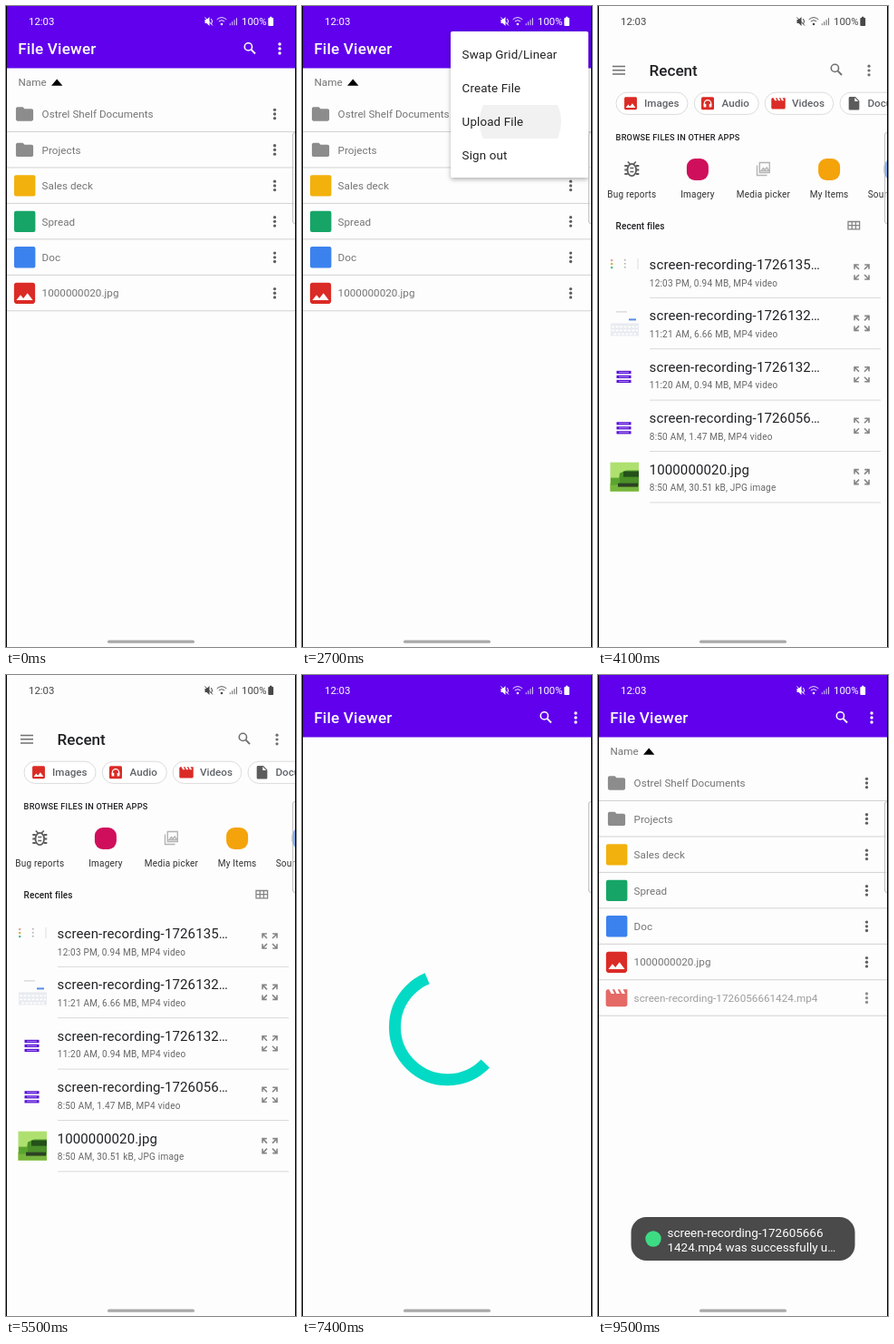
Animation of 320 by 706 pixels, one loop 9.6 s. Source, as an HTML page:

```html
<!DOCTYPE html>
<html lang="en">
<head>
<meta charset="utf-8">
<title>File Viewer</title>
<style>
  html, body { margin: 0; width: 100%; height: 100%; overflow: hidden; background: #fdfdfd; }
  svg { display: block; width: 100vw; height: 100vh; }
  text { font-family: Roboto, sans-serif; white-space: pre; }
</style>
</head>
<body>
<svg id="stage" viewBox="0 0 320 706" xmlns="http://www.w3.org/2000/svg"></svg>
<script>
const LOOP = 9600, STEP = 100;
const PURPLE = '#6000ec', PAGE = '#fdfdfd', RED = '#db2b26';
const ROW = 39.45, PICK_ROW = 56.4;

// Markup helpers
const text = (x, y, size, fill, str, { weight = 400, spacing = 0, anchor = 'start' } = {}) =>
  `<text x="${x}" y="${y}" font-size="${size}" fill="${fill}" font-weight="${weight}" letter-spacing="${spacing}" text-anchor="${anchor}">${str}</text>`;
const rect = (x, y, w, h, fill, r = 0, extra = '') =>
  `<rect x="${x}" y="${y}" width="${w}" height="${h}" rx="${r}" fill="${fill}" ${extra}/>`;
const circle = (x, y, r, fill, extra = '') => `<circle cx="${x}" cy="${y}" r="${r}" fill="${fill}" ${extra}/>`;
const stroke = (d, color, width = 1.5, extra = '') =>
  `<path d="${d}" fill="none" stroke="${color}" stroke-width="${width}" ${extra}/>`;
const group = (id, body, extra = '') => `<g id="${id}" ${extra}>${body}</g>`;
const clip = (id, x, y, w, h) => `<clipPath id="${id}">${rect(x, y, w, h, '#000')}</clipPath>`;
const list = (items, fn) => items.map(fn).join('');

// Icons on a 24-unit grid
const glyphs = {
  folder: 'M10 4H4c-1.1 0-2 .9-2 2v12c0 1.1.9 2 2 2h16c1.1 0 2-.9 2-2V8c0-1.1-.9-2-2-2h-8z',
  image: 'M21 19V5c0-1.1-.9-2-2-2H5c-1.1 0-2 .9-2 2v14c0 1.1.9 2 2 2h14c1.1 0 2-.9 2-2zM8.5 13.5l2.5 3 3.5-4.5 4.5 6H5z',
  movie: 'M18 4l2 4h-3l-2-4h-2l2 4h-3l-2-4H8l2 4H7L5 4H4c-1.1 0-2 .9-2 2v12c0 1.1.9 2 2 2h16c1.1 0 2-.9 2-2V4z',
  file: 'M14 2H6c-1.1 0-2 .9-2 2v16c0 1.1.9 2 2 2h12c1.1 0 2-.9 2-2V8zM13 9V3.5L18.5 9z',
};
const icon = (name, cx, cy, size, fill) =>
  `<path d="${glyphs[name]}" fill="${fill}" transform="translate(${cx - size / 2} ${cy - size / 2}) scale(${size / 24})"/>`;
const dots = (x, y, gap, r, fill) => list([-gap, 0, gap], d => circle(x, y + d, r, fill));
const search = (x, y, fill) =>
  circle(x - 1.6, y - 1.6, 4.1, 'none', `stroke="${fill}" stroke-width="1.6"`) +
  stroke(`M${x + 1.4} ${y + 1.4}l4.6 4.6`, fill, 1.9);

function statusBar() {
  const bars = list([0, 1, 2, 3], i => rect(246.8 + i * 2.4, 19.2 - i * 2, 1, 2 + i * 2, 'currentColor', 0, 'opacity=".8"'));
  const arcs = list([5.3, 3.2], r => stroke(`M${238 - r} ${20.2 - r}q${r} ${-r * .85} ${2 * r} 0`, 'currentColor', .9));
  return text(25, 21, 11.4, 'currentColor', '12:03') +
    '<path d="M219.5 15h2l3-3v10l-3-3h-2z" fill="currentColor"/>' +
    stroke('M219.5 12.5l8.5 9M226.5 14q2 3 0 6', 'currentColor', 1) +
    arcs + circle(238, 20, 1.3, 'currentColor') + bars +
    text(260, 21, 11.4, 'currentColor', '100%') +
    rect(289.3, 13, 5.8, 9, 'currentColor', 1) + rect(291, 11.8, 2.4, 2, 'currentColor');
}

const files = [
  ['Ostrel Shelf Documents', y => icon('folder', 20.5, y, 23, '#8c8c8c')],
  ['Projects', y => icon('folder', 20.5, y, 23, '#8c8c8c')],
  ['Sales deck', y => rect(9, y - 11.7, 23.4, 23.4, '#f2b10c', 2)],
  ['Spread', y => rect(9, y - 11.7, 23.4, 23.4, '#17a567', 2)],
  ['Doc', y => rect(9, y - 11.7, 23.4, 23.4, '#3c82ee', 2)],
  ['1000000020.jpg', y => icon('image', 20.5, y, 31, RED)],
  ['screen-recording-1726056661424.mp4', y => icon('movie', 20.5, y, 28.5, RED)],
];
function fileRow([name, draw], i) {
  const y = 119 + i * ROW;
  return group('row' + i, draw(y) + text(39.6, y + 4.2, 11.67, '#757575', name, { spacing: .03 }) +
    dots(296.5, y, 4.7, 1.65, '#606060')) +
    rect(1, y + 19, 318, 1, '#d2d2d2', 0, `id="line${i}"`);
}

const viewer = rect(0, 0, 320, 706, PAGE) +
  group('files', text(13.5, 88.3, 11.67, '#757575', 'Name') +
    '<path d="M50 87.8l6.2-7.2 6.2 7.2z" fill="#000"/>' + files.map(fileRow).join('')) +
  group('spinner', circle(160.5, 387.7, 58, 'none',
    'id="arc" pathLength="1" stroke="#03dac5" stroke-width="13"')) +
  rect(0, 0, 320, 68.5, PURPLE) +
  text(13.2, 53, 17.1, '#fff', 'File Viewer', { weight: 500, spacing: .21 }) +
  search(269, 46.5, '#fff') + dots(302, 47, 5, 1.7, '#fff') +
  circle(302, 47, 16, '#fff', 'id="tap"');

const menu = rect(164, 28, 152, 161, '#fff', 2, 'filter="url(#shadow)"') +
  circle(241, 127.5, 45, '#f1f1f1', 'id="menuRipple" clip-path="url(#menuItem)"') +
  list(['Swap Grid/Linear', 'Create File', 'Upload File', 'Sign out'], (s, i) =>
    text(176.6, 58.3 + i * 37, 13.4, '#222', s, { spacing: .125 }));

const bug = (x, y, c) =>
  `<ellipse cx="${x}" cy="${y + .5}" rx="4.8" ry="6.6" fill="none" stroke="${c}" stroke-width="1.8"/>` +
  list([-4, .5, 5], d => stroke(`M${x - 8} ${y + d}h3.5M${x + 4.5} ${y + d}h3.5`, c, 1.8)) +
  stroke(`M${x - 4.5} ${y - 8.5}l2.5 2.5M${x + 4.5} ${y - 8.5}l-2.5 2.5M${x - 2} ${y - 1.5}h4M${x - 2} ${y + 2.5}h4`, c, 1.7);

const headphones = (x, y) => rect(x - 7, y - 7, 14, 14, RED, 1.5) +
  stroke(`M${x - 3.7} ${y + 3}v-3a3.7 3.7 0 0 1 7.4 0v3`, '#fff', 1.2) +
  rect(x - 4.3, y + .5, 2.6, 3.6, '#fff') + rect(x + 1.7, y + .5, 2.6, 3.6, '#fff');

const chips = [
  [20, 79, 51, 'Images', icon('image', 36, 107.3, 18.5, RED)],
  [106.3, 71, 136.5, 'Audio', headphones(121, 107.3)],
  [184.2, 75.5, 214, 'Videos', icon('movie', 199, 107.3, 18.5, RED)],
  [267, 100, 297.5, 'Documents', icon('file', 282.5, 107.3, 17.5, '#5c5c5c')],
];
const apps = [
  ['Bug reports', x => bug(x, 180, '#5c5c5c')],
  ['Imagery', x => rect(x - 12, 168, 24, 24, '#cf0f5c', 9)],
  ['Media picker', x => stroke(`M${x - 4.2} 172.5h11v11h-11zM${x - 7} 175.5v11h11M${x - 2.5} 181.5l2.4-3 1.8 2 2-2.6 2.5 3.6z`, '#b5b5b5', 1.4)],
  ['My Items', x => rect(x - 12, 168, 24, 24, '#f4a30b', 9)],
  ['Sound picker', x => rect(x - 12, 168, 24, 24, '#3b7fe8', 9)],
];

const listThumb = y => list([0, 1, 2], i => rect(14, y + 2 + i * 4, 2.4, 2.2, ['#e3a7a0', '#d9b64d', '#5fba91'][i]) +
  rect(29, y + 2 + i * 4, 1.5, 1.5, '#aaa')) + rect(43.5, y + 1, 1, 12, '#ddd');
const keyboardThumb = y => rect(14, y + 16, 31, 14, '#e8ebf0') + rect(20, y + 3, 12, 1, '#ccc') +
  rect(34, y + 11, 8, 2, '#5a8de8') + stroke(`M15 ${y + 20}h29M15 ${y + 24}h29M17 ${y + 28}h25`, '#fff', 1.8, 'stroke-dasharray="3 1.5"');
const barsThumb = y => list([0, 1, 2], i => rect(20.5, y + 12 + i * 5, 16, 3.2, '#5a12d6') +
  rect(23, y + 13.2 + i * 5, 11, .8, '#b99af0'));
const photoThumb = y => rect(13.5, y, 31.5, 32, '#aee070') + rect(13.5, y + 23, 31.5, 9, '#76b63c') +
  `<path d="M24 ${y + 12}l7-3h14v17H22z" fill="#4a8f28"/>` + rect(28, y + 10, 17, 6, '#24501a') +
  rect(14, y + 17, 10, 8, '#5aa52f') + rect(22, y + 23, 22, 4, '#2c4224');

const recents = [
  ['screen-recording-1726135…', '12:03 PM, 0.94 MB, MP4 video', listThumb],
  ['screen-recording-1726132…', '11:21 AM, 6.66 MB, MP4 video', keyboardThumb],
  ['screen-recording-1726132…', '11:20 AM, 0.94 MB, MP4 video', barsThumb],
  ['screen-recording-1726056…', '8:50 AM, 1.47 MB, MP4 video', barsThumb],
  ['1000000020.jpg', '8:50 AM, 30.51 kB, JPG image', photoThumb],
];
const expand = (x, y) => list([[-1, -1], [1, -1], [-1, 1], [1, 1]], ([a, b]) =>
  stroke(`M${x + 8 * a} ${y + 3.2 * b}V${y + 8 * b}H${x + 3.2 * a}M${x + 8 * a} ${y + 8 * b}L${x + 3 * a} ${y + 3 * b}`, '#858585', 1.6));

function recentRow([name, info, thumb], i) {
  const y = 285 + i * PICK_ROW;
  return thumb(y - 8) + text(56.6, y + 5, 15, '#202124', name, { spacing: .13 }) +
    text(56.8, y + 23.5, 10, '#666', info, { spacing: .22 }) + expand(291, y + 8) +
    rect(57, y + 35.8, 255, 1, '#d9d9d9');
}

const pickerBody =
  stroke('M16 66.5h14M16 70.8h14M16 75.1h14', '#707070', 1.5) +
  text(56.6, 77, 17.1, '#202124', 'Recent', { weight: 500 }) +
  search(263, 70, '#707070') + dots(299, 71, 4.8, 1.6, '#707070') +
  list(chips, ([x, w, tx, label, art]) => rect(x, 95.2, w, 24.2, '#fff', 12.1, 'stroke="#dcdcdc"') + art +
    text(tx, 111.4, 11.67, '#5f6368', label, { weight: 500 })) +
  text(19.6, 148.4, 9.2, '#202124', 'BROWSE FILES IN OTHER APPS', { weight: 500, spacing: .24 }) +
  list(apps, ([label, draw], i) => {
    const x = 37.3 + i * 72.6;
    return draw(x) + text(x, 211.2, 10, '#303030', label, { spacing: .2, anchor: 'middle' });
  }) +
  text(19.6, 245.6, 10, '#202124', 'Recent files', { weight: 500, spacing: .1 }) +
  stroke('M276 237.5h12.6v8.4h-12.6zM276 241.7h12.6M280.2 237.5v8.4M284.4 237.5v8.4', '#858585', 1.3) +
  circle(160, 462, 10, '#000', 'id="rowRipple" clip-path="url(#pickItem)"') +
  list(recents, recentRow);

const picker = rect(0, 0, 320, 706, PAGE) + group('pickerBody', pickerBody);

const dialog = rect(22, 301, 276, 117.5, PAGE, 2, 'filter="url(#deepShadow)"') +
  text(40, 333, 16.67, '#202020', 'Upload File', { weight: 500, spacing: .2 }) +
  text(25.6, 354.2, 11.67, '#757575', 'File Name:', { weight: 700 }) +
  text(89.8, 354.2, 11.67, '#757575', 'screen-recording-1726056661424.mp4') +
  rect(225, 382, 64, 29, '#f3eefc', 3, 'id="press"') +
  circle(257, 396.5, 20, '#dfcff8', 'id="uploadRipple" clip-path="url(#uploadButton)"') +
  text(168, 401.2, 11.67, PURPLE, 'CANCEL', { weight: 500, spacing: 1.04 }) +
  text(231.6, 401.2, 11.67, PURPLE, 'UPLOAD', { weight: 500, spacing: 1.04 });

const toast = rect(36.5, 597, 247, 48, '#4a4a4a', 17) + circle(61, 621, 8.7, '#3ddc84') +
  text(76.5, 619, 13.45, '#fff', 'screen-recording-172605666') +
  text(76.5, 634.6, 13.45, '#fff', '1424.mp4 was successfully u…');

const stage = document.getElementById('stage');
stage.innerHTML = `<defs>
  <filter id="shadow" x="-20%" y="-20%" width="140%" height="140%"><feDropShadow dx="0" dy="2" stdDeviation="2.5" flood-opacity=".3"/></filter>
  <filter id="deepShadow" x="-20%" y="-30%" width="140%" height="170%"><feDropShadow dx="0" dy="8" stdDeviation="6" flood-opacity=".4"/></filter>
  ${clip('menuItem', 164, 109, 152, 37)}${clip('pickItem', 1, 434, 318, 56)}${clip('uploadButton', 225, 382, 64, 29)}
</defs>` +
  group('viewer', viewer) + group('menu', menu) + group('picker', picker) +
  rect(0, 0, 320, 706, '#000', 0, 'id="scrim"') + group('dialog', dialog) + group('toast', toast) +
  group('status', statusBar()) +
  rect(316.4, 139.5, 8, 100, '#fff', 2.5, 'fill-opacity=".4" stroke="#bdbdbd"') +
  rect(112, 698.6, 96, 3.2, '#a9a9a9', 1.6) +
  rect(0, 0, 1, 706, '#000') + rect(319, 0, 1, 706, '#000');

// Motion helpers
const el = id => document.getElementById(id);
const set = (id, attrs) => Object.entries(attrs).forEach(([k, v]) => el(id).setAttribute(k, v));
const fade = (id, a) => set(id, { opacity: a, visibility: a > 0 ? 'visible' : 'hidden' });
const ramp = (t, a, b) => Math.min(1, Math.max(0, (t - a) / (b - a)));
const pulse = (t, a, b, c, d) => ramp(t, a, b) * (1 - ramp(t, c, d));
const within = (t, a, b) => t >= a && t < b;

// Smooth 0..1 rise along a cubic whose x control points are given
function bezierRise(x, x0, x1, x2, x3) {
  if (x <= x0) return 0;
  if (x >= x3) return 1;
  let lo = 0, hi = 1;
  for (let i = 0; i < 24; i++) {
    const u = (lo + hi) / 2, v = 1 - u;
    const at = x0 * v ** 3 + 3 * x1 * v * v * u + 3 * x2 * v * u * u + x3 * u ** 3;
    if (at < x) lo = u; else hi = u;
  }
  return lo * lo * (3 - 2 * lo);
}

function drawSpinner(elapsed) {
  const turns = elapsed / 1333, p = turns - Math.floor(turns);
  const tail = .75 * bezierRise(p, .5, .7, .6, 1);
  const head = .75 * bezierRise(p, 0, .2, .1, .5);
  const spin = tail + .25 * p + .4 * turns + .215;
  const sweep = Math.max(.005, head - tail);
  set('arc', {
    'stroke-dasharray': `${sweep} ${1 - sweep}`,
    transform: `rotate(${spin * 360 - 90} 160.5 387.7)`,
  });
}

function render(t) {
  const loading = within(t, 7200, 9000);
  fade('files', loading ? 0 : 1);
  fade('spinner', loading ? 1 : 0);
  if (loading) drawSpinner(t - 7078);

  const added = t >= 9000 ? ramp(t, 9290, 9590) : 0;
  fade('row6', added);
  fade('line6', t >= 9300 ? 1 : 0);

  set('tap', { r: 8 + 9 * ramp(t, 1100, 1300) });
  fade('tap', .22 * pulse(t, 1050, 1150, 1500, 1900));
  fade('menu', pulse(t, 1250, 1500, 2850, 3050));
  set('menuRipple', { r: 45 + 90 * ramp(t, 2700, 2850) });
  fade('menuRipple', t >= 2700 ? 1 : 0);

  const pick = pulse(t, 3000, 3300, 5750, 6000);
  fade('picker', pick);
  set('pickerBody', { transform: `translate(0 ${t < 3400 ? -18 : 0})` });
  set('rowRipple', { r: 20 + 300 * ramp(t, 5500, 5800) });
  fade('rowRipple', t > 5500 ? .08 * pulse(t, 5500, 5600, 6000, 6100) : 0);
  const ink = within(t, 3100, 3400) ? '#b8b8b8' : pick > .5 ? '#484848' : '#fff';
  set('status', { color: ink });

  const shown = pulse(t, 5900, 6200, 7150, 7400);
  fade('scrim', .6 * shown);
  fade('dialog', shown);
  fade('press', t >= 7000 ? 1 : 0);
  set('uploadRipple', { r: 20 + 24 * ramp(t, 7000, 7150) });
  fade('uploadRipple', t >= 7000 ? 1 : 0);

  fade('toast', ramp(t, 9050, 9400));
}

const start = performance.now();
function tick() {
  const t = (performance.now() - start) % LOOP;
  render(Math.floor(t / STEP) * STEP);
  requestAnimationFrame(tick);
}
tick();
</script>
</body>
</html>
```
